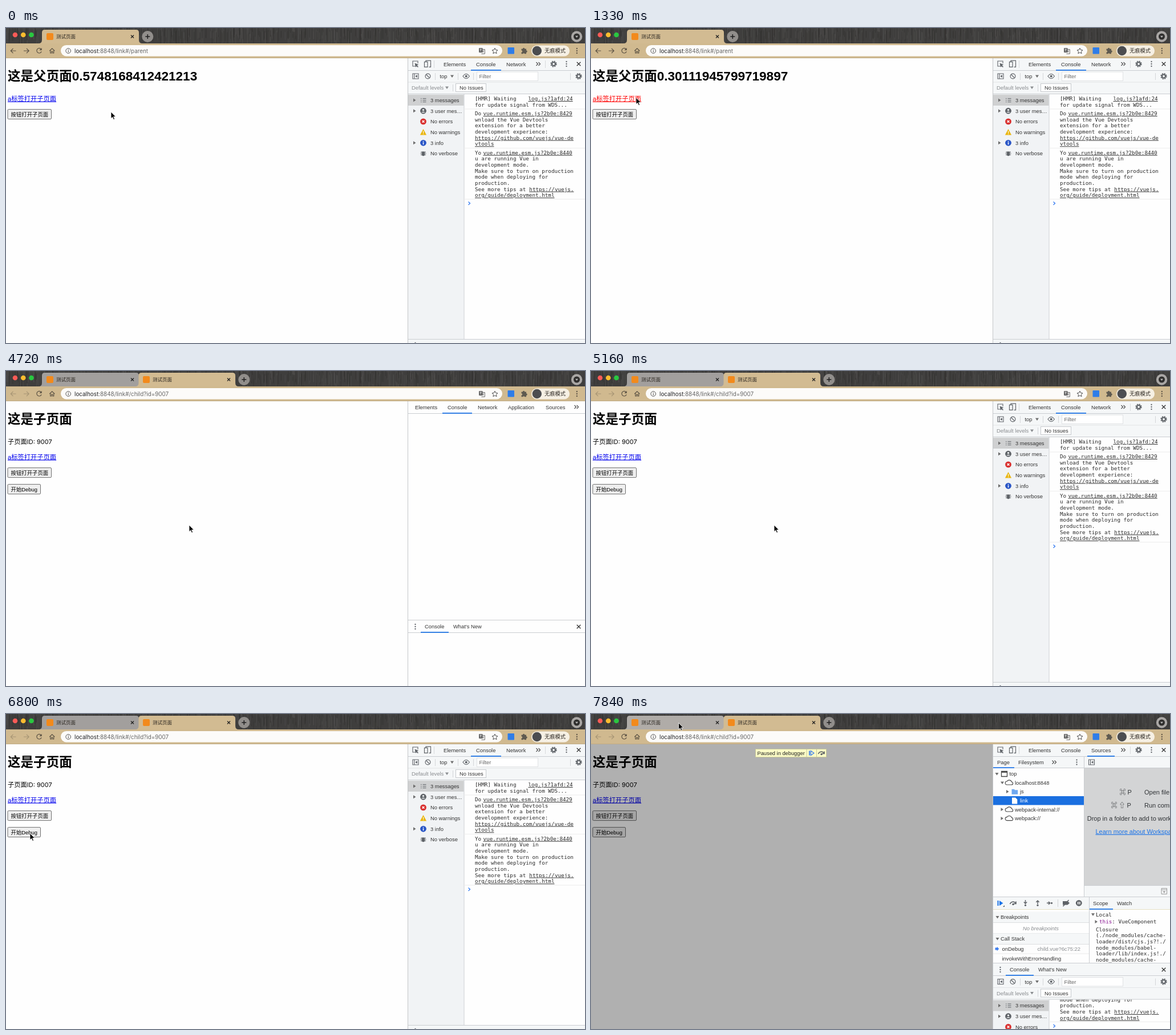
Write an HTML page that moves like this. It is 1015 px wide and 552 px high and loops after 8000 ms.

```html
<!DOCTYPE html>
<html lang="zh-CN">
<head>
<meta charset="utf-8">
<title>测试页面</title>
<style>
html, body { margin: 0; width: 100%; height: 100%; overflow: hidden; background: #fefefe; }
svg { display: block; width: 1015px; height: 552px; }
text { font: 9.4px "Liberation Sans", "Noto Sans CJK SC", "Noto Sans CJK JP", "DejaVu Sans", sans-serif; fill: #333; white-space: pre; }
.mono { font: 9.28px "DejaVu Sans Mono", monospace; fill: #2b2b2b; }
.ui { font: 9.87px Inter, "Noto Sans CJK SC", sans-serif; fill: #666; }
.tab { font: 8.5px "Noto Sans CJK SC", "Noto Sans CJK JP", sans-serif; fill: #2b2620; }
.body { font-size: 11.28px; fill: #000; }
.h1 { font-size: 22.56px; font-weight: 700; fill: #000; }
.big { font-size: 11px; fill: #303336; }
.link { fill: #00e; text-decoration: underline; }
.u { text-decoration: underline; }
.grey { fill: #8a8d90; }
.ico { fill: none; stroke: #5f6368; stroke-width: 1.2; }
</style>
</head>
<body>
<svg id="stage" viewBox="0 0 1015 552" xmlns="http://www.w3.org/2000/svg"></svg>
<script>
const LOOP = 8000, TICK = 147;
const BAR = "#f5f7f8", SIDE = "#f1f3f5";
const el = id => document.getElementById(id);
const text = (x, y, s, cls = "", more = "") => `<text x="${x}" y="${y}" class="${cls}" ${more}>${s}</text>`;
const rect = (x, y, w, h, fill, more = "") => `<rect x="${x}" y="${y}" width="${w}" height="${h}" fill="${fill}" ${more}/>`;
const dot = (x, y, r, fill) => `<circle cx="${x}" cy="${y}" r="${r}" fill="${fill}"/>`;
const path = (d, fill = "#5f6368", more = "") => `<path d="${d}" fill="${fill}" ${more}/>`;
const ico = (d, color = "#5f6368", w = 1.2) => `<path d="${d}" class="ico" style="stroke:${color};stroke-width:${w}"/>`;
const ring = (x, y, r, color = "#5f6368", w = 1.2) => `<circle cx="${x}" cy="${y}" r="${r}" class="ico" style="stroke:${color};stroke-width:${w}"/>`;
const group = (id, s) => `<g id="${id}">${s}</g>`;
const hline = (x, y, w, c = "#cacdd1") => rect(x, y, w, 1, c);
const vline = (x, y, h, c = "#cacdd1") => rect(x, y, 1, h, c);
const cross = (x, y, r, c = "#333") => ico(`M${x - r},${y - r}l${2 * r},${2 * r}m0,${-2 * r}l${-2 * r},${2 * r}`, c, 1.3);
const dots = (x, y, c = "#5f6368") => [-4, 0, 4].map(d => dot(x, y + d, 1.15, c)).join("");
const down = (x, y, c = "#6e6e6e") => path(`M${x - 3},${y - 2}h6l-3,4.6z`, c);
const right = (x, y) => path(`M${x - 2},${y - 3}v6l4.5,-3z`, "#6e6e6e");
const gear = (x, y) => ring(x, y, 3, "#5f6368", 2.2) +
  `<circle cx="${x}" cy="${y}" r="4.9" class="ico" stroke-dasharray="2.3 1.55" style="stroke-width:1.5"/>`;
const more = (x, y) => ico(`M${x - 3.5},${y - 3}l3,3l-3,3m4,-6l3,3l-3,3`, "#444", 1.1);
const stepOver = (x, y) => ico(`M${x - 5.5},${y + 2}a5.5,5 0 0 1 10,-1.5m.5,-3v4h-4`, "#5f6368", 1.6) + dot(x, y + 2.5, 1.7, "#5f6368");
const cloud = (x, y) => ico(`M${x - 4},${y + 4}h8a2.5,2.5 0 0 0 .3,-5a4.3,4 0 0 0 -8,-1a3,3 0 0 0 -.3,6z`, "#444", 1.1);
const collapse = (x, y) => ico(`M${x - 5},${y - 4.5}h10v9h-10zm3,0v9`, "#5f6368", 1.1) + path(`M${x + 3},${y - 2.5}v5l-3.6,-2.5z`);

let seed = 7;
const rnd = () => (seed = seed * 16807 % 2147483647) / 2147483647;

function stripes(n, color) {
  let d = "";
  for (let i = 0; i < n; i++) {
    const y = rnd() * 14 - 6;
    d += `M${(rnd() * 1015).toFixed(1)},${y.toFixed(1)}v${(10 + rnd() * 18).toFixed(1)}`;
  }
  return `<path d="${d}" stroke="${color}" stroke-width=".8" clip-path="url(#strip)"/>`;
}

const tabShape = (x, w) => `M${x - 6},27q6,0 6,-6V8q0,-5 5,-5h${w - 10}q5,0 5,5v13q0,6 6,6z`;
const tabLabel = x => rect(x + 8, 9, 12, 12, "#f28a1c", 'rx="2"') + text(x + 25, 18, "测试页面", "tab") + cross(x + 158.5, 15, 2.5, "#222");
const newTab = `<g id="plus">${dot(0, 15, 10, "#918e8b")}${ico("M-4,15h8m-4,-4v8", "#1e1e1e", 1.5)}</g>`;

function browser() {
  const dark = "#5a5143";
  return rect(0, 0, 1015, 27, "#3f3e3d") + stripes(420, "#4f4d4c") + stripes(300, "#343332") +
    dot(16, 12, 4.3, "#fc5b57") + dot(30.3, 12, 4.3, "#fdbc2f") + dot(44.5, 12, 4.3, "#29c840") +
    `<path id="tab1" d="${tabShape(63, 170)}"/><path id="tab2" fill="#d2bb92"/>` +
    tabLabel(63) + group("label2", tabLabel(232)) + newTab +
    dot(1000.5, 15, 9.7, "#aaa7a5") + dot(1000.5, 15, 5.5, "#302f2e") + path("M998,13.7h5l-2.5,3.4z", "#bbb") +
    rect(0, 27, 1015, 26, "#d0b98f") + hline(0, 52, 1015, "#c0ab85") +
    group("nav", ico("M17.5,40h-9m4,-4.2l-4.2,4.2l4.2,4.2", dark) + group("fwd", ico("M31,40h9m-4,-4.2l4.2,4.2l-4.2,4.2", dark))) +
    ico("M61.6,37a4.3,4.3 0 1 0 .6,4.3", dark) + path("M62.7,34.8v4.2h-4.2z", dark) +
    ico("M76.3,40l4.5,-4.2l4.5,4.2m-7.5,-1v5h2v-3h2v3h2v-5", dark, 1.1) +
    rect(96, 30, 774, 19.4, "#fcfbf9", 'rx="9.7"') +
    ring(109.2, 40, 4.3, "#555", 1) + rect(108.7, 39.3, 1.1, 3.2, "#555") + rect(108.7, 37.2, 1.1, 1.2, "#555") +
    `<text x="120" y="43.5" class="ui"><tspan fill="#202124">localhost</tspan><tspan id="url"></tspan></text>` +
    rect(829, 35, 6.6, 8, "#666", 'rx="1"') + ico("M835,37.5h4.3v7.7h-6", "#666", 1) + ico("M830.5,37h3.5m-2,0v4", "#fff", .8) + ico("M835,40h3m-1.5,0v3", "#666", .8) +
    ico("M857,35.2l1.5,3.2l3.5,.4l-2.6,2.4l.7,3.5l-3.1,-1.8l-3.1,1.8l.7,-3.5l-2.6,-2.4l3.5,-.4z", "#4f4f4f", 1) +
    rect(879.5, 34, 11.5, 11.5, "#2f7de8", 'rx="1"') +
    path("M903.5,36.5h2.4a1.7,1.7 0 1 1 3.4,0h2.7v2.8a1.8,1.8 0 1 1 0,3.6v2.3h-2.8a1.6,1.6 0 0 0 -3,0h-2.7v-2.6a1.6,1.6 0 0 0 0,-3.4z", "#5f5a50") +
    rect(921, 30.5, 67, 19, "#f6f0e4", 'rx="9.5"') + dot(930.8, 40, 8.2, "#4c4d50") +
    text(944, 43.4, "无痕模式", "tab", 'style="font-size:9.25px"') + dots(1000.8, 40, dark);
}

const button = (y, w, s) => rect(3, y, w, 17, "#efefef", 'stroke="#6f6f6f" rx="1.5"') + text(8.5, y + 11.9, s, "", 'style="fill:#000"');

function parentPage() {
  return `<text x="3" y="92" class="h1">这是父页面<tspan id="num"></tspan></text>` +
    text(3, 127.7, "a标签打开子页面", "body link", 'id="plink"') + button(142.6, 76.5, "按钮打开子页面");
}

function childPage() {
  return text(3, 92, "这是子页面", "h1") +
    text(3, 127.7, `子页面<tspan style="font-family:Inter,sans-serif;font-size:11px">ID: 9007</tspan>`, "body") +
    text(3, 154.5, "a标签打开子页面", "body link") +
    button(169.6, 76.5, "按钮打开子页面") + button(198.6, 57.5, "开始Debug");
}

function paused() {
  return rect(0, 53, 704, 499, "#000", 'opacity=".31"') +
    rect(288.5, 61.5, 124, 14, "#fbfbc6", 'stroke="#c9c99a"') + text(291.5, 71.8, "Paused in debugger", "", 'style="font-size:9.3px;fill:#222"') +
    vline(377.5, 62, 13, "#c9c99a") + vline(395, 62, 13, "#c9c99a") +
    rect(382, 64.5, 1.8, 8, "#4080e8") + path("M385.3,64.5v8l5.5,-4z", "none", 'stroke="#4080e8" stroke-width="1.4"') + stepOver(404, 68);
}

function toolTabs(third, ux, uw) {
  return rect(705, 53, 310, 21, BAR) + hline(705, 74, 310) + rect(ux, 73, uw, 1.7, "#1a73e8") +
    ico("M721,67h-8v-9h9v4", "#5f6368", 1.1) + path("M716.5,61.5l7,2.7l-3,1l2.5,2.7l-1.2,1.1l-2.5,-2.7l-1.2,2.8z") +
    ico("M736,59.5v-2.3h8.5v2m-11,.2h5.5v9h-5.5zm8,9h3v-9", "#5f6368", 1.2) + vline(750, 57, 13, "#d8dadd") +
    text(767, 66.8, "Elements") + text(824, 66.8, "Console") + text(877, 66.8, third) + more(933, 63) +
    vline(945, 57, 13, "#d8dadd") + gear(960, 63) + dots(982.5, 63) + cross(1004, 63, 3.3);
}

// Baselines are spaced by one mono line.
const lines = (x, y, list) => list.map((s, i) => text(x, y + i * 10.65, s, "mono")).join("");

function messages() {
  const src = (x, y, s) => text(x, y, s, "mono u");
  return lines(822, 127, ["[HMR] Waiting", "for update signal from WDS..."]) + src(915.5, 127, "log.js?1afd:24") +
    hline(803, 141.5, 212, "#ededed") +
    lines(822, 153, ["Do", "wnload the Vue Devtools", "extension for a better", "development experience:"]) +
    src(836.5, 153, "vue.runtime.esm.js?2b0e:8429") + src(822, 195.6, "https://github.com/vuejs/vue-de") + src(822, 206.3, "vtools") +
    hline(803, 210, 212, "#ededed") +
    lines(822, 221.7, ["Yo", "u are running Vue in", "development mode.", "Make sure to turn on production", "mode when deploying for", "production.", "See more tips at"]) +
    src(836.5, 221.7, "vue.runtime.esm.js?2b0e:8440") + src(917.3, 285.6, "https://vuejs.") + src(822, 296.3, "org/guide/deployment.html") +
    hline(803, 299.5, 212, "#ededed") + ico("M810.5,304.6l3,2.7l-3,2.7", "#367cf1", 1.3);
}

function consoleBody(dy, scroll, id) {
  const rows = ["3 messages", "3 user mes…", "No errors", "No warnings", "3 info", "No verbose"];
  const y = i => 126.5 + i * 18.7;
  const icons = ico("M727,123.5h1.5m2,0h6m-9.5,3h1.5m2,0h6m-9.5,3h1.5m2,0h6", "#5f6368", 1.1) +
    dot(731.5, y(1), 5.4, "#5f6368") + dot(731.5, y(1) - 1.6, 1.7, SIDE) + path(`M728,${y(1) + 3}q3.5,-3.6 7,0z`, SIDE) +
    dot(731.5, y(2), 5.4, "#d9302f") + cross(731.5, y(2), 1.9, "#fff") +
    path(`M731.5,${y(3) - 5.5}l5.6,10.3h-11.2z`, "#e9b50c") + rect(731, y(3) - 2, 1.1, 3.6, "#fff") + rect(731, y(3) + 2.4, 1.1, 1.2, "#fff") +
    dot(731.5, y(4), 5.4, "#2a56c6") + rect(730.8, y(4) - 1, 1.5, 4, "#fff") + rect(730.8, y(4) - 3.2, 1.5, 1.4, "#fff") +
    ico(`M727,${y(5) - 2.3}h9m-9.5,2.3h10m-9.5,2.3h9m-7,-6l1.5,1.5m4,-1.5l-1.5,1.5`, "#5f6368", 1) + rect(729, y(5) - 3.7, 5, 8, "#5f6368", 'rx="2.5"');
  return `<g transform="translate(0 ${dy})">` +
    rect(705, 75, 310, 470, "#fefefe") + rect(705, 75, 310, 40, BAR) + hline(705, 94.5, 310, "#e3e5e7") + hline(705, 115, 310) +
    collapse(718, 84.5) + ring(739.5, 84.5, 4.4) + ico("M736.5,81.5l6,6") + vline(752, 79, 12, "#d4d6d9") +
    text(760.5, 88, "top") + down(782, 84.5) + vline(792, 79, 12, "#d4d6d9") +
    ico("M801,84.5q5.7,-8 11.4,0q-5.7,8 -11.4,0z") + dot(806.7, 84.5, 2, "#5f6368") + vline(819, 79, 12, "#d4d6d9") +
    rect(825.5, 77, 107, 15.5, "#fff", 'stroke="#dfe1e4"') + text(829.5, 88.3, "Filter", "", 'style="fill:#666"') +
    vline(989, 79, 12, "#d4d6d9") + gear(1004, 84.5) +
    text(711, 108, "Default levels", "grey") + down(773, 104.5, "#8a8d90") + vline(783, 99, 12, "#d4d6d9") +
    rect(788.5, 97.5, 53, 14, "#fff", 'stroke="#c6c9cd"') + text(795, 108.2, "No Issues") +
    rect(705, 116, 97.5, 429, SIDE) + rect(705, 117, 97.5, 19, "#cfd0d1") + vline(802.5, 116, 429) +
    rows.map((s, i) => text(744, y(i) + 3.4, s)).join("") + [0, 1, 4].map(i => right(716, y(i))).join("") + icons +
    `<g clip-path="url(#log)"><g id="${id}" transform="translate(0 ${scroll})">${messages()}</g></g></g>`;
}

const drawerTabs = bg => rect(705, 436, 310, 22, bg) + hline(705, 436, 310) + hline(705, 458, 310) + rect(727, 457, 49, 1.7, "#1a73e8") +
  dots(717.5, 448) + text(734, 451, "Console") + text(784, 451, "What's New") + cross(1004, 448, 3.3);

const panelBase = rect(704, 53, 311, 499, "#fefefe");
const panelEdge = vline(704, 53, 499, "#c4c6c9");

function consolePanel() {
  return panelBase + toolTabs("Network", 815, 53) + consoleBody(0, 0, "log1") +
    rect(705, 545, 310, 7, BAR) + hline(705, 545, 310) + dot(717.5, 552, 1.2, "#5f6368") + panelEdge;
}

function emptyPanel() {
  const tabs = { Elements: 717, Console: 774, Network: 827, Application: 880, Sources: 946 };
  return panelBase + hline(705, 74, 310) + rect(765, 73, 52, 1.7, "#1a73e8") +
    Object.keys(tabs).map(s => text(tabs[s], 66.8, s)).join("") + more(1000, 63) + drawerTabs("#fefefe") + panelEdge;
}

function tree() {
  const row = (x, y, s, style = "") => text(x, y + 3.3, s, "", `style="${style}"`);
  return rect(705, 95, 159, 225, "#fefefe") + rect(705, 144, 159, 15.5, "#1a6fe0") +
    down(711.5, 105) + ico("M719.5,100.5h10v9h-10zm0,1.5h10", "#444", 1.3) + row(733.5, 105, "top") +
    down(721, 120.5) + cloud(733, 120) + row(743, 120.5, "localhost:8848") +
    right(730, 136) + path("M737.5,131.7h4.3l1.4,1.5h5v7.5h-10.7z", "#6fa8f0") + row(752, 136, "js") +
    path("M738,146.5h6l3.3,3.3v7.7h-9.3z", "#fff") + row(752, 151.7, "link", "fill:#fff") +
    right(720.5, 167.3) + cloud(733, 167) + row(743, 167.3, "webpack-internal://") +
    right(720.5, 183) + cloud(733, 182.6) + row(743, 183, "webpack://");
}

function sourcesPanel() {
  const header = (y, s) => rect(705, y - 9.5, 168, 18.5, BAR) + hline(705, y + 9, 168, "#dcdee0") + down(712.5, y) + text(718, y + 3.4, s);
  const stack = header(356, "Breakpoints") + text(757, 378.6, "No breakpoints", "grey", 'style="font-style:italic"') + hline(705, 384, 168, "#dcdee0") +
    header(394, "Call Stack") + rect(705, 404, 168, 15, "#fdfdfd") + path("M708.5,409.5h3.3v-1.8l3.4,3.8l-3.4,3.8v-1.8h-3.3z", "#3d7ff0") +
    text(720.5, 414.7, "onDebug") + text(858, 414.7, "child.vue?6c75:22", "grey", 'text-anchor="end"') + hline(705, 419.5, 168, "#ececec") +
    text(720.5, 431.5, "invokeWithErrorHandling") +
    down(880, 351.3) + text(885, 354.5, "Local", "mono") + right(885.5, 364) +
    text(891, 367.2, `<tspan fill="#881391">this</tspan>: VueComponent`, "mono") +
    lines(885, 380.6, ["Closure", "(./node_modules/cache-", "loader/dist/cjs.js?!./", "node_modules/babel-", "loader/lib/index.js!./", "node_modules/cache-"]);
  return panelBase + toolTabs("Sources", 870, 48) +
    rect(705, 75, 310, 20, BAR) + hline(705, 94, 310) + rect(705, 93.3, 37, 1.7, "#1a73e8") +
    text(712, 87.5, "Page") + text(749, 87.5, "Filesystem") + more(812, 84.5) + dots(851.5, 84.5) + collapse(877.5, 84.5) + tree() +
    rect(865, 95, 150, 205, "#d3d4d5") + text(926.5, 141, "⌘ P", "big") + text(970, 141, "Open file", "big") +
    text(911.5, 164, "⌘ ⇧ P", "big") + text(970, 164, "Run command", "big") +
    text(869.7, 187, "Drop in a folder to add to workspace", "big") +
    text(884.5, 209.8, "Learn more about Workspaces", "big u", 'style="fill:#1a73e8"') +
    rect(865, 300, 150, 20, BAR) + hline(865, 300, 150) + ico("M1000,305.5h9.5v10h-9.5zm0,2.5h9.5", "#999", 1) + path("M1002.3,310.5h5l-2.5,3.2z", "#999") +
    vline(864, 75, 245) + rect(705, 321, 310, 21, BAR) + hline(705, 320, 310) + hline(705, 342, 310, "#e6e1c4") +
    rect(712.5, 327, 2, 9, "#1a73e8") + path("M716,327v9l6.5,-4.5z", "#1a73e8") + path("M725,335v3h-3z") + stepOver(740, 331) +
    ico("M761.5,326v6m-2.7,-2.5l2.7,2.7l2.7,-2.7", "#5f6368", 1.5) + dot(761.5, 335.2, 1.6, "#5f6368") +
    ico("M783,333v-6m-2.7,2.7l2.7,-2.7l2.7,2.7", "#5f6368", 1.5) + dot(783, 335.2, 1.6, "#5f6368") +
    ico("M799,331.3h5m-2,-2.6l2.6,2.6l-2.6,2.6", "#5f6368", 1.5) + dot(807.5, 331.3, 1.6, "#5f6368") + vline(818, 325, 13, "#d0d2d5") +
    path("M827,328h8.5l3.5,3.3l-3.5,3.3h-8.5z") + ico("M827.5,337l10,-11", "#5f6368", 1.5) +
    dot(855.3, 331.3, 5.4, "#5f6368") + rect(853, 329, 1.6, 4.6, "#fff") + rect(856, 329, 1.6, 4.6, "#fff") +
    text(880, 334.7, "Scope") + text(922, 334.7, "Watch") + rect(873, 341, 42, 1.7, "#1a73e8") +
    group("stack", stack) + vline(873, 321, 115) +
    consoleBody(384.5, -145, "log2") + drawerTabs(BAR) + panelEdge;
}

el("stage").innerHTML = `<defs>
  <clipPath id="strip"><rect width="1015" height="27"/></clipPath>
  <clipPath id="log"><rect x="803" y="116" width="212" height="429"/></clipPath></defs>` +
  rect(0, 0, 1015, 552, "#fefefe") + group("parent", parentPage()) + group("child", childPage()) + group("paused", paused()) +
  group("console", consolePanel()) + group("empty", emptyPanel()) + group("sources", sourcesPanel()) + browser() +
  `<path id="mouse" d="M0,0v11.6l2.7,-2.4l1.9,4.2l1.9,-.8l-1.9,-4.1h3.7z" fill="#000" stroke="#fff" stroke-width=".8"/>`;

// Pointer moves: start time, number of steps, end point.
const moves = [[150, 8, 79, 122], [1480, 3, 295, 207], [2340, 2, 321, 270], [5910, 1, 312, 267],
  [6060, 1, 102, 255], [6350, 3, 42, 209], [7250, 1, 82, 150], [7400, 4, 153.5, 15.5]];

function pointer(t) {
  let x = 184, y = 147;
  for (const [start, n, ex, ey] of moves) {
    if (t < start) break;
    const k = Math.min(1, (Math.floor((t - start) / TICK) + 1) / n);
    const e = k * k * (3 - 2 * k);
    x += (ex - x) * e;
    y += (ey - y) * e;
  }
  return [x, y];
}

const show = (id, on) => el(id).setAttribute("display", on ? "inline" : "none");

function draw(t) {
  const opened = t >= 1480, halted = t >= 6950, sources = t >= 7100;
  show("parent", !opened);
  show("child", t >= 1630);
  show("paused", halted);
  show("console", !opened || t >= 5010 && !sources);
  show("log1", !opened || t >= 5160);
  show("empty", t >= 4720 && t < 5010);
  show("sources", sources);
  show("stack", t >= 7250);
  el("num").textContent = t < 740 ? "0.5748168412421213" : "0.30111945799719897";
  el("plink").style.fill = t >= 1330 ? "#f00" : "#00e";
  el("url").textContent = opened ? ":8848/link#/child?id=9007" : ":8848/link#/parent";

  const grow = opened ? Math.min(1, (Math.floor((t - 1480) / TICK) + 1) / 3) : 0;
  el("tab1").setAttribute("fill", !opened ? "#d2bb92" : t >= 7840 ? "#b0aca8" : "#a29f9d");
  el("tab2").setAttribute("d", opened ? tabShape(232.5, 169.5 * grow) : "");
  show("label2", grow === 1);
  el("plus").setAttribute("transform", `translate(${248.3 + 169 * grow} 0)`);
  el("nav").setAttribute("opacity", opened ? .35 : 1);
  const [x, y] = pointer(t);
  el("mouse").setAttribute("transform", `translate(${x} ${y})`);
}

const begin = performance.now();
function frame() {
  draw((performance.now() - begin) % LOOP);
  requestAnimationFrame(frame);
}
draw(0);
requestAnimationFrame(frame);
</script>
</body>
</html>
```
